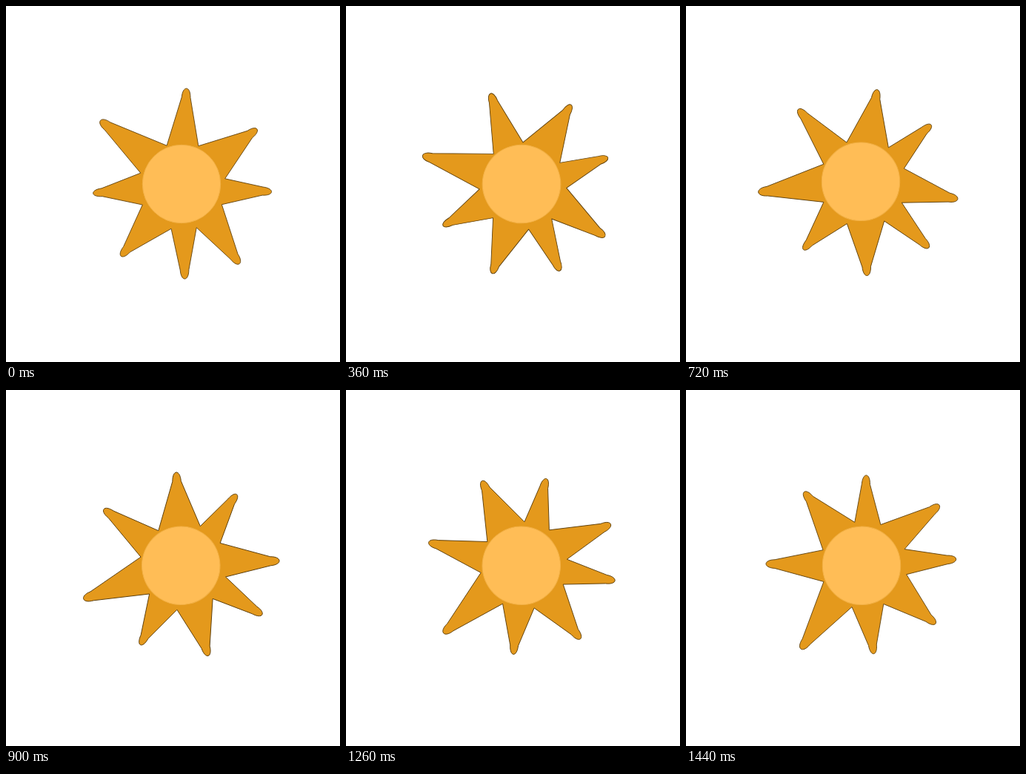
An HTML page that plays this animation: 451x480 px, repeating every 1.53 s.

```html
<!DOCTYPE html>
<html lang="en">
<head>
<meta charset="utf-8">
<title>Spinning sun</title>
<style>
  html, body { margin: 0; width: 100%; height: 100%; overflow: hidden; background: #fff; }
  svg { display: block; width: 100%; height: 100%; }
</style>
</head>
<body>
<svg viewBox="0 0 451 480">
  <g id="sun">
    <path id="rays" fill="#e4991c" stroke="#5e400e" stroke-width="0.9" stroke-linejoin="round"/>
    <circle r="52.7" fill="#ffbd56" stroke="#f2b045" stroke-width="1"/>
  </g>
</svg>
<script>
const STEP = 90, LOOP = 1530;

// Hand-cut rays, clockwise from up: tip angle, length, angle of the notch that follows.
const RAYS = [
  [3, 129, 24], [54, 126, 83], [95, 122, 117], [144, 133, 161],
  [178, 128, 193], [220, 127, 242], [264, 120, 285], [308, 139, 339]
];

const rad = deg => deg * Math.PI / 180;

// Point at a distance along a direction and to its clockwise side.
function at(deg, along, side = 0) {
  const s = Math.sin(rad(deg)), c = Math.cos(rad(deg));
  return [along * s + side * c, side * s - along * c];
}
const str = (...points) => points.map(p => p.map(v => v.toFixed(2)).join(' ')).join(' ');

// The notches lie on a circle a little below the disc's centre.
const notch = deg => at(deg, 58.8 + 3.4 * Math.cos(rad(deg - 167)));

// Straight sides up to the shoulders, then a blunt rounded cap.
function ray([angle, length, next]) {
  const half = length / 22, base = length - 12, peak = base + 16;
  const point = (along, side) => at(angle, along, side * half);
  return `L${str(point(base, -1))}`
    + `C${str(point(peak, -0.9), point(peak, 0.9), point(base, 1))}`
    + `L${str(notch(next))}`;
}

const sun = document.getElementById('sun');
document.getElementById('rays').setAttribute('d',
  `M${str(notch(RAYS.at(-1)[2]))}${RAYS.map(ray).join('')}Z`);

// An even turn, then a slightly faster, swaying one; the sun hops up in between.
function draw(ms) {
  const step = Math.floor(ms % LOOP / STEP);
  const late = Math.max(0, step - 8);
  const turn = 5.48 * step + 0.53 * late + Math.sin(late * Math.PI / 4);
  const [x, y] = step > 6 ? [236 + late / 8, 236.8] : [237, 240];
  sun.setAttribute('transform', `translate(${x} ${y}) rotate(${-turn})`);
}

let start;
function tick(now) {
  start ??= now;
  draw(Math.max(0, now - start));
  requestAnimationFrame(tick);
}
draw(0);
requestAnimationFrame(tick);
</script>
</body>
</html>
```
